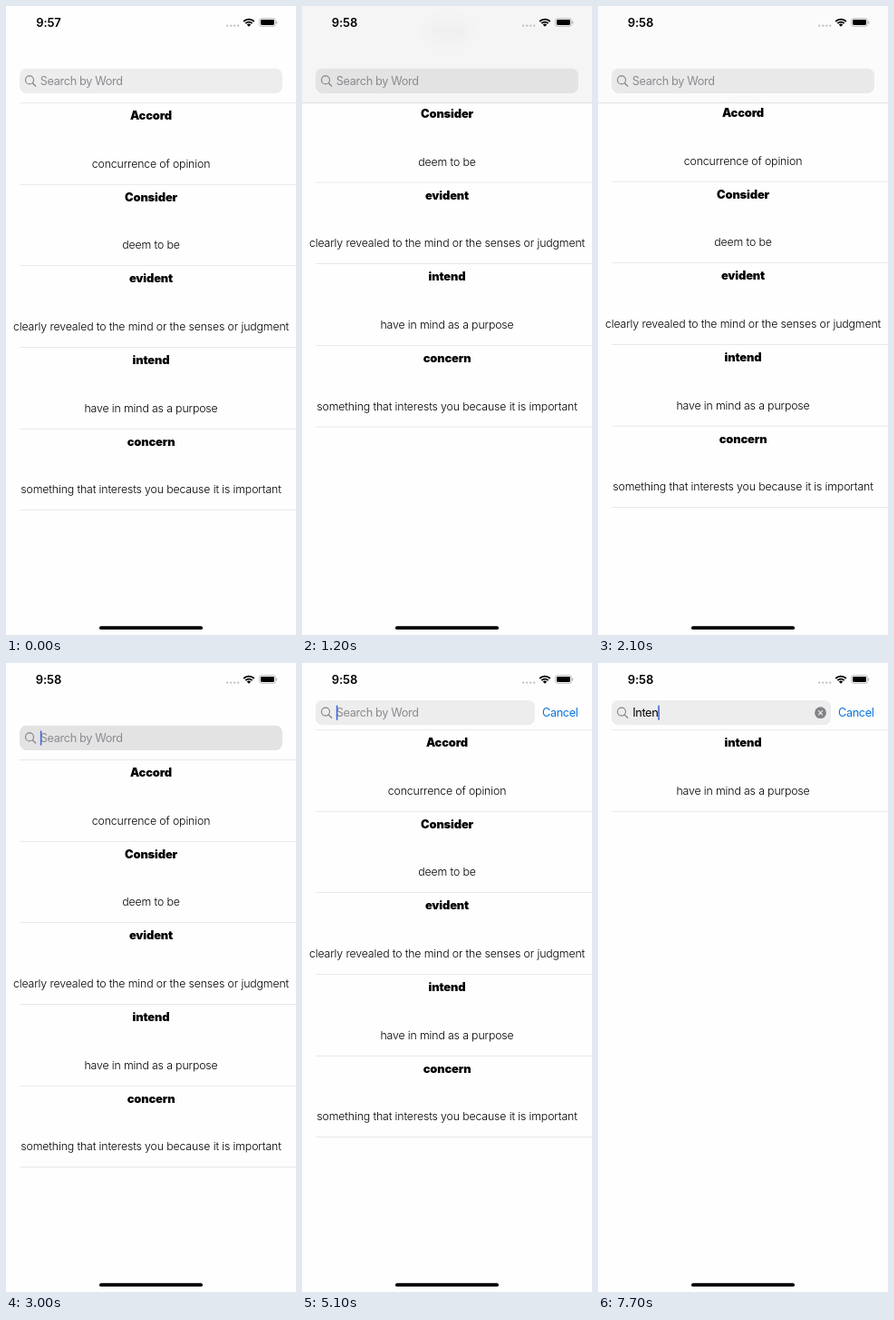
An HTML page with a canvas that plays this animation: 320x692 px, repeating every 8000 ms.

```html
<!DOCTYPE html>
<html lang="en">
<head>
<meta charset="utf-8">
<title>Word search</title>
<style>
html, body { margin: 0; width: 100%; height: 100%; overflow: hidden; background: #fefefe; }
canvas { display: block; width: 320px; height: 692px; }
</style>
</head>
<body>
<canvas id="stage"></canvas>
<script>
const W = 320, H = 692, LOOP = 8000, STEP = 100;
const BG = '#fefefe', BLUE = '#0a74dc', CARET = '#4468d8';
const HAIR = 0.4, ROW = 89.66, PEAK = 95.3;
const canvas = document.getElementById('stage');
const ctx = canvas.getContext('2d');
const dpr = window.devicePixelRatio || 1;
canvas.width = W * dpr;
canvas.height = H * dpr;

const words = [
  ['Accord', 'concurrence of opinion'],
  ['Consider', 'deem to be'],
  ['evident', 'clearly revealed to the mind or the senses or judgment'],
  ['intend', 'have in mind as a purpose'],
  ['concern', 'something that interests you because it is important']
];
const typing = [[5800, 'I'], [6100, 'In'], [6600, 'Int'], [7300, 'Inte'], [7700, 'Inten']];
// Caret opacity keys: [time, opacity]
const blink = [[2900, 0], [3000, 1], [3500, 1], [3700, 0], [3900, 0], [4100, 1], [4500, 1],
  [4700, 0], [4900, 0], [5100, 1], [5500, 1], [5700, 0], [5800, 1]];

const clamp = v => Math.max(0, Math.min(1, v));
const mix = (a, b, k) => a + (b - a) * k;
const ramp = (t, a, b) => clamp((t - a) / (b - a));
const smooth = k => k * k * (3 - 2 * k);
const gray = v => `rgb(${Math.round(v)},${Math.round(v)},${Math.round(v + 1)})`;

function keyed(keys, t) {
  if (t <= keys[0][0]) return keys[0][1];
  for (let i = 1; i < keys.length; i++) {
    const [a, va] = keys[i - 1], [b, vb] = keys[i];
    if (t < b) return mix(va, vb, ramp(t, a, b));
  }
  return keys[keys.length - 1][1];
}

function scrollAt(t) {
  if (t < 1596) return PEAK * (1 - Math.pow(1 - ramp(t, 800, 1400), 3));
  const u = 10.5 * (t - 1596) / 1000;
  return t > 2300 ? 0 : PEAK * (1 + u) * Math.exp(-u);
}

function text(str, x, y, { weight = 400, size = 12.7, color = '#000', align = 'left', track = -0.35 } = {}) {
  ctx.font = `${weight} ${size}px Inter, "Liberation Sans", sans-serif`;
  ctx.letterSpacing = track + 'px';
  ctx.textAlign = align;
  ctx.fillStyle = color;
  ctx.fillText(str, x, y);
  return ctx.measureText(str).width;
}

function box(x, y, w, h, r, color) {
  ctx.fillStyle = color;
  ctx.beginPath();
  ctx.roundRect(x, y, w, h, r);
  ctx.fill();
}

function hairline(x, y, color = '#c6c6c8') {
  ctx.fillStyle = color;
  ctx.fillRect(x, y, W - x, HAIR);
}

function disc(x, y, r, color) {
  ctx.fillStyle = color;
  ctx.beginPath();
  ctx.arc(x, y, r, 0, Math.PI * 2);
  ctx.fill();
}

function stroke(points, width, color) {
  ctx.strokeStyle = color;
  ctx.lineWidth = width;
  ctx.lineCap = 'round';
  ctx.beginPath();
  for (const [x1, y1, x2, y2] of points) {
    ctx.moveTo(x1, y1);
    ctx.lineTo(x2, y2);
  }
  ctx.stroke();
}

function statusBar(t) {
  text(t < 200 ? '9:57' : '9:58', 47, 22.6, { weight: 600, size: 13, align: 'center', track: -0.1 });
  for (let i = 0; i < 4; i++) disc(244.2 + i * 4, 21.6, 1.2, '#c2c2c4');
  const cx = 268, cy = 22.8, a = Math.PI * 0.25;
  ctx.strokeStyle = '#000';
  ctx.lineCap = 'butt';
  for (const [r, w] of [[8.2, 1.9], [5.2, 1.8], [1.6, 3.2]]) {
    ctx.lineWidth = w;
    ctx.beginPath();
    ctx.arc(cx, cy, r, -Math.PI / 2 - a, -Math.PI / 2 + a);
    ctx.stroke();
  }
  ctx.strokeStyle = '#a9a9ab';
  ctx.lineWidth = 0.8;
  ctx.beginPath();
  ctx.roundRect(279.6, 13.7, 17.8, 8.6, 2.4);
  ctx.stroke();
  box(281, 15.1, 15, 5.8, 1.3, '#000');
  box(298.2, 16.6, 1, 2.8, 0.5, '#a9a9ab');
}

function list(top, scroll, query) {
  const rows = words.filter(w => w[0].toLowerCase().includes(query.toLowerCase()));
  ctx.save();
  ctx.beginPath();
  ctx.rect(0, top, W, H - top);
  ctx.clip();
  rows.forEach(([word, meaning], i) => {
    const y = top - scroll + i * ROW;
    text(word, 160, y + 18.5, { weight: 900, size: 12.9, align: 'center', track: -0.15 });
    text(meaning, 160, y + 71, { weight: 300, size: 12.35, align: 'center', track: -0.15 });
    hairline(15, y + ROW - HAIR);
  });
  ctx.restore();
}

function header(bottom, scroll) {
  const k = clamp(scroll / 8);
  ctx.fillStyle = gray(mix(254, 245, k));
  ctx.fillRect(0, 0, W, bottom);
  if (k > 0) {
    ctx.save();
    ctx.beginPath();
    ctx.rect(0, 0, W, bottom);
    ctx.clip();
    ctx.filter = 'blur(7px)';
    box(139, bottom - scroll, 46, 26, 6, `rgba(0,0,0,${0.02 * k})`);
    ctx.restore();
    hairline(0, bottom, '#b2b2b4');
  } else {
    hairline(15, bottom);
  }
}

function searchBar(t, open, scroll, query) {
  const y = mix(68.8, 41, open), right = mix(305, 257, open);
  const pressed = t >= 3000 ? 1 - open : 0;
  const shade = mix(237, 227, Math.max(clamp(scroll / 8), pressed));
  box(15, y, right - 15, 27.2, 7.5, gray(shade));

  ctx.strokeStyle = '#85858a';
  ctx.lineWidth = 1.15;
  ctx.beginPath();
  ctx.arc(26, y + 12.6, 4.5, 0, Math.PI * 2);
  ctx.stroke();
  stroke([[29.3, y + 15.9, 32.6, y + 19.2]], 1.3, '#85858a');

  const base = y + 18.2;
  let caret = 38;
  if (query) {
    caret += text(query, 38.2, base) + 0.4;
    ctx.globalAlpha = ramp(t, 5700, 5900);
    const cx = 245.5, cy = y + 13.7, d = 2.1;
    disc(cx, cy, 6.4, '#828287');
    stroke([[cx - d, cy - d, cx + d, cy + d], [cx - d, cy + d, cx + d, cy - d]], 1.1, '#f2f2f3');
  } else {
    text('Search by Word', 37.8, base, { color: '#8b8b90' });
  }
  ctx.globalAlpha = keyed(blink, t);
  box(caret - 0.2, y + 5.4, 1.6, 16.6, 0.8, CARET);

  ctx.globalAlpha = open;
  text('Cancel', mix(313, 265, open), base, { color: BLUE });
  ctx.globalAlpha = 1;
}

function draw(t) {
  ctx.setTransform(dpr, 0, 0, dpr, 0, 0);
  ctx.fillStyle = BG;
  ctx.fillRect(0, 0, W, H);
  const scroll = scrollAt(t);
  const open = smooth(ramp(t, 3000, 3500));
  const top = mix(106.67, 73.67, open);
  const query = typing.reduce((q, [at, s]) => t >= at ? s : q, '');
  list(top, scroll, query);
  header(top, scroll);
  searchBar(t, open, scroll, query);
  statusBar(t);
  box(103, 682.3, 114, 3.8, 1.9, '#000');
}

const start = performance.now();
function frame() {
  const t = (performance.now() - start) % LOOP;
  draw(Math.floor(t / STEP) * STEP);
  requestAnimationFrame(frame);
}
frame();
</script>
</body>
</html>
```
